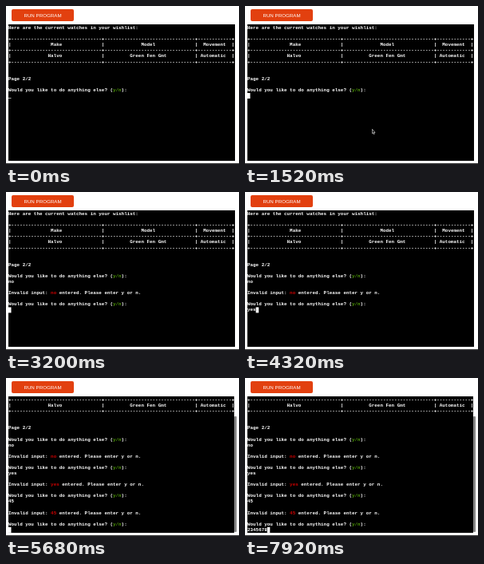
Animation, 292 px wide and 198 px high, one loop 8000 ms. Source, as an HTML page:

```html
<!DOCTYPE html>
<html lang="en">
<head>
<meta charset="utf-8">
<title>Terminal</title>
<style>
html, body { margin: 0; width: 100%; height: 100%; overflow: hidden; background: #fff; }
div, pre, svg { position: absolute; }
#run { left: 7px; top: 4px; width: 78px; height: 15px; border-radius: 2px; background: #e2400f; overflow: hidden; }
#run span {
  position: absolute; width: 780px; line-height: 150px; text-align: center;
  font: 62px/150px "Liberation Sans", sans-serif; color: #fff;
  transform: scale(.1); transform-origin: 0 0;
}
#term { left: 3px; top: 23px; width: 284px; height: 170.5px; background: #000; overflow: hidden; }
/* Laid out at ten times the size, so that fractional widths are kept */
pre {
  left: 0; top: .5px; margin: 0; color: #fff;
  font: bold 59px/70.8px "Liberation Mono", monospace;
  transform: scale(.1); transform-origin: 0 0;
}
pre b { color: #4e9a06; }
pre i { color: #c00; font-style: normal; }
pre u { display: inline-block; width: 35.4px; height: 70.8px; vertical-align: top; background: #fff; }
pre u.idle { background: linear-gradient(#0000 88%, #aaa 88%); }
#bar { left: 286px; top: 23px; width: 4px; height: 171px; background: #fff; }
#bar div { top: 25px; width: 3px; height: 145px; border-radius: 1px; background: #858585; }
#edge { left: 0; top: 197px; width: 100%; height: 1px; background: #333; }
svg { left: 0; top: 0; }
</style>
</head>
<body>
<div id="run"><span>RUN PROGRAM</span></div>
<div id="term"><pre id="text"></pre></div>
<div id="bar"><div></div></div>
<div id="edge"></div>
<svg id="mouse" width="5" height="8"><path d="M.4 .4V5.8L1.6 4.8L2.4 6.7L3.2 6.3L2.5 4.5H4Z" fill="#000" stroke="#fff" stroke-width=".6"/></svg>
<script>
const LOOP = 8000, STEP = 80, ROWS = 24;
const FOCUS = 640, SHOW = 160, HIDE = 1760;
const widths = [32, 32, 12];
const $ = id => document.getElementById(id);

const center = (s, w) => s.padStart(s.length + ((w - s.length) >> 1)).padEnd(w);
const rule = '+' + widths.map(w => '-'.repeat(w) + '+').join('');
const row = (...cells) => '|' + cells.map((c, i) => center(c, widths[i]) + '|').join('');
const ask = 'Would you like to do anything else? (<b>y/n</b>):\n';
const intro = [
  'Here are the current watches in your wishlist:', '',
  rule, row('Make', 'Model', 'Movement'),
  rule, row('Halvo', 'Green Fen Gmt', 'Automatic'),
  rule, '', '', 'Page 2/2', '', ask
].join('\n');

// Each answer: key times, then the time of Enter
const answers = [
  ['no', [1760, 2000], 2480],
  ['yes', [3440, 3680, 3920], 4480],
  ['45', [5360, 5520], 5680],
  ['2345678', [6640, 6880, 7120, 7360, 7520, 7760, 7920], Infinity]
];

function screen(t) {
  let out = intro;
  for (const [word, keys, enter] of answers) {
    out += word.slice(0, keys.filter(k => k <= t).length);
    if (t < enter) break;
    out += `\n\nInvalid input: <i>${word}</i> entered. Please enter y or n.\n\n${ask}`;
  }
  return out + (t < FOCUS ? '<u class="idle"></u>' : '<u></u>');
}

let shown;
function draw() {
  const t = Math.floor(performance.now() % LOOP / STEP) * STEP;
  const lines = screen(t).split('\n');
  const html = lines.slice(-ROWS).join('\n');
  if (html !== shown) $('text').innerHTML = shown = html;
  $('bar').hidden = lines.length <= ROWS;

  const p = Math.min(1, Math.max(0, (t - 320) / 320));
  const ease = p * p * (3 - 2 * p);
  $('mouse').style.visibility = t >= SHOW && t < HIDE ? 'visible' : 'hidden';
  $('mouse').style.transform = `translate(${172 - 13 * ease}px, ${177 - 23 * ease}px)`;
  requestAnimationFrame(draw);
}
draw();
</script>
</body>
</html>
```
